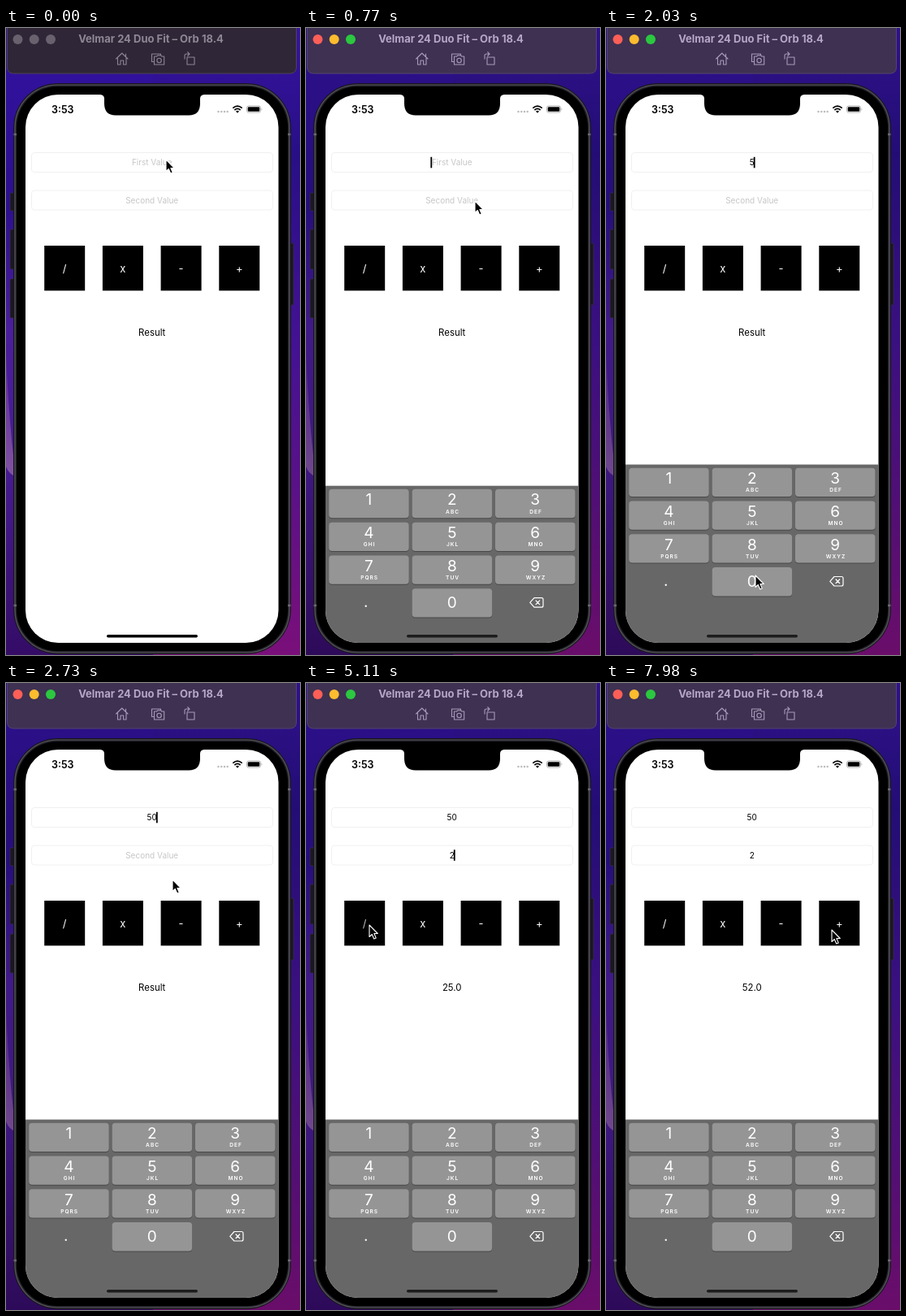
Animation of 362 by 772 pixels, one loop 8 s. Source, as an HTML page:

```html
<!DOCTYPE html>
<html lang="en">
<head>
<meta charset="utf-8">
<title>Calculator demo</title>
<style>
  html, body { margin: 0; width: 100%; height: 100%; overflow: hidden; background: #2a1080; }
  svg { display: block; width: 100vw; height: 100vh; }
  text { font-family: Inter, Roboto, sans-serif; text-anchor: middle; }
  .field { fill: #fff; stroke: #f0f0f0; }
  .value { font-size: 10px; fill: #000; }
  .value.empty { fill: #c6c6c8; }
  .op { font-size: 13px; fill: #fff; }
  .result { font-size: 11.4px; fill: #000; }
  .key { fill: #959595; }
  .digit { font-size: 19px; fill: #fff; }
  .letters { font-size: 6.6px; font-weight: 600; letter-spacing: 1px; fill: #fff; }
  .bar { fill: #2f2737; stroke: #4b4352; }
  .title { font-size: 13px; font-weight: 700; fill: #8f8795; }
  .tools { fill: none; stroke: #8e8498; stroke-width: 1.1; stroke-linejoin: round; stroke-linecap: round; }
  .lights circle { fill: #69616d; }
  .active .bar { fill: #3e3152; stroke: #54456a; }
  .active .title { fill: #b7a6c8; }
  .active .tools { stroke: #a99ab8; }
  .active .lights circle:nth-child(1) { fill: #fc5f57; }
  .active .lights circle:nth-child(2) { fill: #fdbc2e; }
  .active .lights circle:nth-child(3) { fill: #2bc840; }
  .shade { opacity: 0; }
  .active .shade { opacity: .13; }
</style>
</head>
<body>
<svg id="stage" viewBox="0 0 362 772" preserveAspectRatio="none">
  <defs>
    <linearGradient id="left" x2="0" y2="1">
      <stop offset="0" stop-color="#3312a0"/>
      <stop offset=".28" stop-color="#2b0f8e"/>
      <stop offset=".48" stop-color="#4a1e9c"/>
      <stop offset=".72" stop-color="#461a90"/>
      <stop offset="1" stop-color="#340c66"/>
    </linearGradient>
    <linearGradient id="right" x2="0" y2="1">
      <stop offset="0" stop-color="#36139f"/>
      <stop offset=".2" stop-color="#280f86"/>
      <stop offset=".5" stop-color="#431293"/>
      <stop offset=".75" stop-color="#5c1186"/>
      <stop offset="1" stop-color="#7a0f7a"/>
    </linearGradient>
    <linearGradient id="wedge" x2="0" y2="1">
      <stop offset="0" stop-color="#5b2b9c"/>
      <stop offset="1" stop-color="#8152a2"/>
    </linearGradient>
    <clipPath id="glass"><rect x="24" y="82" width="311.5" height="675" rx="40"/></clipPath>
  </defs>

  <rect width="181" height="772" fill="url(#left)"/>
  <rect x="181" width="181" height="772" fill="url(#right)"/>
  <path d="M0 400Q3 480 12 552Q4 550 0 540Z" fill="url(#wedge)"/>
  <rect class="shade" width="362" height="772" fill="#000"/>

  <!-- window bar -->
  <path class="bar" d="M1.5 -2V48Q1.5 56 9.5 56H349.500Q357.500 56 357.500 48V-2Z"/>
  <g class="lights">
    <circle cx="14.500" cy="14" r="6"/><circle cx="34.700" cy="14" r="6"/><circle cx="55" cy="14" r="6"/>
  </g>
  <text class="title" x="178.500" y="18.300">Velmar 24 Duo Fit – Orb 18.4</text>
  <g class="tools">
    <path d="M135.500 38L142.800 31L150 38M137.500 37V45H141V40H144.600V45H148V37M147.500 32V35"/>
    <path d="M182 41.500H179.500V32H190.500V33.500M182.500 35H185.500L187 33.700H190.500L192 35H194.700V45H182.500Z"/>
    <circle cx="188.600" cy="40" r="2.700"/>
    <path d="M223 36H232V45H223ZM220 38V34Q220 32 222 32H226M223.700 29.700L226 32L223.700 34.300"/>
  </g>

  <!-- phone -->
  <g fill="#1b1722" stroke="#373142" stroke-width=".7">
    <rect x="5" y="203" width="6" height="22" rx="1.500"/>
    <rect x="5" y="248" width="6" height="49" rx="1.500"/>
    <rect x="5" y="309" width="6" height="48" rx="1.500"/>
    <rect x="348" y="265" width="6" height="76" rx="1.500"/>
  </g>
  <rect x="9.500" y="68.500" width="341" height="702" rx="54" fill="#242329" stroke="#17151b"/>
  <rect x="11" y="70" width="338" height="699" rx="52.500" fill="none" stroke="#56555c" stroke-width="1.200"/>
  <path d="M9.500 131H13M347 131H350.500M9.500 711H13M347 711H350.500" stroke="#6a6870" stroke-width="2.500"/>
  <rect x="13" y="72" width="334" height="695" rx="50.500"/>
  <g clip-path="url(#glass)">
    <rect x="24" y="82" width="312" height="675" fill="#fff"/>
    <g id="app"></g>
    <g id="keyboard"><rect x="24" y="537.500" width="312" height="225" fill="#676767"/></g>
    <rect x="124" y="747" width="112" height="3.500" rx="1.700" fill="#000" id="home"/>
  </g>
  <path d="M116 81V82Q121 82.500 121 87V93Q121 107.500 135 107.500H225Q239 107.500 239 93V87Q239 82.500 244 82V81Z"/>
  <text x="69.800" y="104.600" font-size="12.500" font-weight="600">3:53</text>
  <g fill="#bdbdbf">
    <circle cx="261.500" cy="103" r="1.250"/><circle cx="265.300" cy="103" r="1.250"/>
    <circle cx="269" cy="103" r="1.250"/><circle cx="272.700" cy="103" r="1.250"/>
  </g>
  <g fill="none" stroke="#000" stroke-width="1.700">
    <path d="M279.300 98.700Q285 93.600 290.700 98.700M281.400 101Q285 97.900 288.600 101"/>
  </g>
  <path d="M283 102.600Q285 101.100 287 102.600L285 104.700Z"/>
  <rect x="296.500" y="96" width="17" height="8" rx="2.300" fill="none" stroke="#999" stroke-width=".8"/>
  <rect x="297.700" y="97.200" width="14.600" height="5.600" rx="1.300"/>
  <path d="M314.700 98.500Q316.200 100 314.700 101.500Z" fill="#999"/>

  <path id="cursor" d="M0 0V14.500L3.300 11.500L5.700 17L8.200 15.900L5.900 10.500H10.300Z"
        fill="#000" stroke="#fff" stroke-width="1.100" stroke-linejoin="round"/>
</svg>
<script>
const LOOP = 8000, STEP = 70, MID = 179.7;
const stage = document.getElementById('stage');
const app = document.getElementById('app');
const keyboard = document.getElementById('keyboard');
const home = document.getElementById('home');
const cursor = document.getElementById('cursor');

function add(parent, tag, attrs, text = '') {
  const el = document.createElementNS('http://www.w3.org/2000/svg', tag);
  for (const k in attrs) el.setAttribute(k, attrs[k]);
  el.textContent = text;
  parent.append(el);
  return el;
}

// form
const fields = [['First Value', 153.5], ['Second Value', 200]].map(([hint, y]) => {
  add(app, 'rect', { class: 'field', x: 31.5, y, width: 297, height: 24, rx: 3.5 });
  return { hint, y, el: add(app, 'text', { class: 'value', x: MID, y: y + 15.7 }) };
});
const ops = [...'/x-+'].map((sign, i) => {
  const x = 47.2 + i * 71.7;
  add(app, 'rect', { x, y: 268, width: 50, height: 55.4 });
  return add(app, 'text', { class: 'op', x: x + 25, y: 300.7 }, sign);
});
const result = add(app, 'text', { class: 'result', x: MID, y: 378.6 });
const caret = add(app, 'rect', { width: 1.8, height: 13.5 });

// keypad
const keys = {};
['1', '2 ABC', '3 DEF', '4 GHI', '5 JKL', '6 MNO', '7 PQRS', '8 TUV', '9 WXYZ', '', '0'].forEach((label, i) => {
  if (!label) return;
  const [digit, letters] = label.split(' ');
  const x = 28.2 + (i % 3) * 102.4, y = 541.7 + Math.floor(i / 3) * 40.8;
  const box = { x, width: 98.5, height: 35.3, rx: 4 };
  add(keyboard, 'rect', { ...box, y: y + 1, fill: '#484848' });
  keys[digit] = add(keyboard, 'rect', { ...box, y, class: 'key' });
  add(keyboard, 'text', { class: 'digit', x: x + 49.2, y: y + (digit === '0' ? 24 : 19.5) }, digit);
  if (letters) add(keyboard, 'text', { class: 'letters', x: x + 50, y: y + 29.7 }, letters);
});
add(keyboard, 'text', { class: 'digit', x: 73.7, y: 687 }, '.');
add(keyboard, 'path', {
  d: 'M281 675.500H290Q292 675.500 292 677.500V685Q292 687 290 687H281L275.800 681.300ZM282.700 678.500L288 684M288 678.500L282.700 684',
  fill: 'none', stroke: '#fff', 'stroke-width': 1.2, 'stroke-linejoin': 'round'
});

// pointer stops: time, x, y
const path = [
  [0, 197, 162], [600, 197, 162], [770, 208, 213], [1260, 194, 569], [1500, 182, 592],
  [1700, 182, 592], [1960, 184, 674], [2310, 184, 674], [2730, 205, 242], [2960, 200, 208],
  [3150, 200, 208], [3640, 182, 553], [4410, 182, 553], [4850, 78, 298], [5740, 78, 298],
  [6060, 146, 302], [6300, 146, 302], [6580, 214, 302], [7080, 214, 302], [7480, 278, 304], [8000, 278, 304]
];
const slope = (i, c) => path[i + 1] ? (path[i + 1][c] - path[i][c]) / (path[i + 1][0] - path[i][0]) : 0;
function tangent(i, c) {
  const a = i ? slope(i - 1, c) : 0, b = slope(i, c);
  return a * b > 0 ? 2 * a * b / (a + b) : 0;
}
function along(t, c) {
  let i = 0;
  while (i < path.length - 2 && t >= path[i + 1][0]) i++;
  const h = path[i + 1][0] - path[i][0], u = (t - path[i][0]) / h, v = 1 - u;
  return path[i][c] * v * v * (1 + 2 * u) + path[i + 1][c] * u * u * (3 - 2 * u)
    + h * u * v * (v * tangent(i, c) - u * tangent(i + 1, c));
}

const at = (t, list) => list.reduce((now, [from, value]) => t >= from ? value : now, '');
const results = [[0, 'Result'], [4970, '25.0'], [6160, '100.0'], [6790, '48.0'], [7630, '52.0']];
const taps = [['5', 1610], ['0', 2100], ['2', 3990]];

function blink(t) {
  const p = (t - at(t, [[0, 570], [1610, 1610], [2170, 2170], [3080, 3080], [4060, 4060]])) / 1000 % 1;
  return p < .6 ? 1 : p < .75 ? (.75 - p) / .15 : p < .94 ? 0 : (p - .94) / .06;
}

function draw(t) {
  stage.classList.toggle('active', t >= 140);
  const values = [at(t, [[1610, '5'], [2170, '50']]), at(t, [[4060, '2']])];
  fields.forEach((f, i) => {
    f.el.textContent = values[i] || f.hint;
    f.el.classList.toggle('empty', !values[i]);
  });

  const on = t < 3080 ? 0 : 1, focus = fields[on];
  const half = focus.el.getComputedTextLength() / 2;
  caret.setAttribute('x', MID - .9 + (values[on] ? half : -half - .6));
  caret.setAttribute('y', focus.y + 5.3);
  caret.setAttribute('opacity', t < 560 ? 0 : blink(t));

  const s = Math.max(0, t - 569) * .01826;
  const rest = (1 + s) * Math.exp(-s);
  keyboard.setAttribute('transform', `translate(0 ${rest * 220})`);
  home.setAttribute('fill', rest < .5 ? '#1d1d1d' : '#000');

  for (const [digit, from] of taps)
    keys[digit].style.fill = t >= from && t < from + 140 ? '#747474' : '';
  result.textContent = at(t, results);
  ops.forEach((el, i) => {
    const since = t - results[i + 1][0] + 140;
    el.setAttribute('opacity', since < 0 || since > 350 ? 1 : since < 140 ? .25 : .25 + .75 * (since - 140) / 210);
  });
  cursor.setAttribute('transform', `translate(${along(t, 1)} ${along(t, 2)})`);
}

function tick(now) {
  const t = now % LOOP;
  draw(t - t % STEP);
  requestAnimationFrame(tick);
}
draw(0);
requestAnimationFrame(tick);
</script>
</body>
</html>
```
